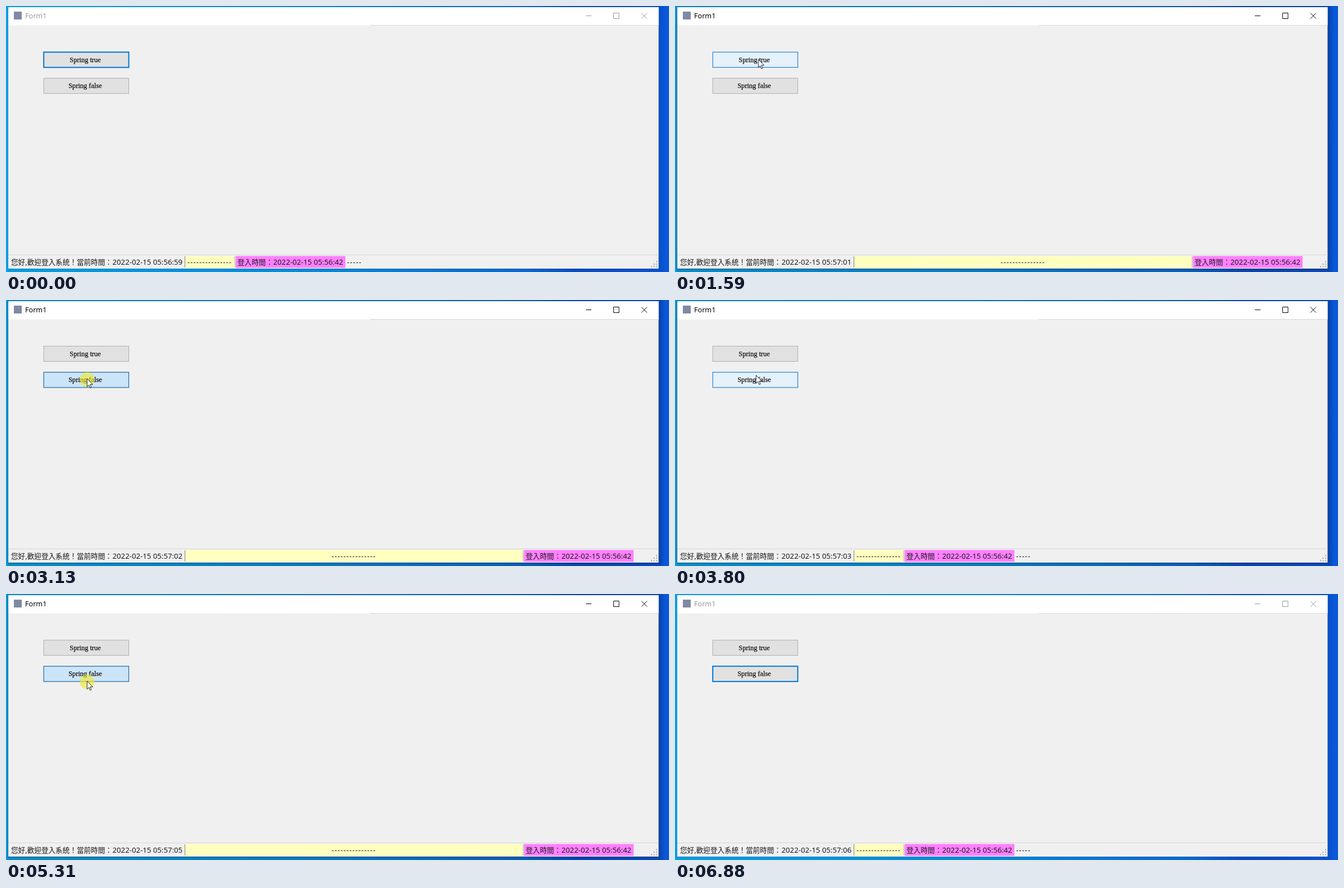
An HTML page for the animation above (6940 ms loop, 1180 px wide and 474 px high).

```html
<!DOCTYPE html>
<html lang="zh-Hant">
<head>
<meta charset="utf-8">
<title>Form1</title>
<style>
  html, body { margin: 0; width: 100%; height: 100%; overflow: hidden; background: #0a57d8; }
  svg { display: block; width: 1180px; height: 474px; }
  .ui { font: 13.2px "Noto Sans", "Open Sans", sans-serif; fill: #1a1a1a; }
  .cjk { font-family: "Noto Sans CJK TC", "Noto Sans CJK", sans-serif; font-size: 12.6px; }
  .dash { letter-spacing: 1.02px; }
  .btn rect { fill: #e1e1e1; stroke: #adadad; }
  .btn text { font: 12.4px "Liberation Serif", serif; text-anchor: middle; fill: #111; stroke: #111; stroke-width: .25; }
  .btn.focus rect { stroke: #0078d7; stroke-width: 2; }
  .btn.hover rect { fill: #e5f1fb; stroke: #2484d4; stroke-width: 1.2; }
  .btn.down rect { fill: #cce4f7; stroke: #1d68a8; stroke-width: 1.2; }
  #caption { font-size: 12.6px; fill: #999; }
  #controls { fill: none; stroke: #999; }
  .active #caption { fill: #000; }
  .active #controls { stroke: #000; }
  #shadow { opacity: .35; }
  .active #shadow { opacity: 1; }
</style>
</head>
<body>
<svg id="stage" viewBox="0 0 1180 474">
  <defs>
    <linearGradient id="sky">
      <stop offset="0" stop-color="#06a6ee"/>
      <stop offset=".45" stop-color="#0791e6"/>
      <stop offset=".78" stop-color="#086edb"/>
      <stop offset=".86" stop-color="#084fcf"/>
      <stop offset="1" stop-color="#0a58da"/>
    </linearGradient>
    <linearGradient id="fade">
      <stop offset="0" stop-color="#001030" stop-opacity=".3"/>
      <stop offset="1" stop-color="#001030" stop-opacity="0"/>
    </linearGradient>
  </defs>

  <rect width="1180" height="474" fill="url(#sky)"/>
  <g id="shadow">
    <rect width="4" height="474" opacity=".07"/>
    <rect x="4" y="468" width="1158" height="6" opacity=".16"/>
    <rect x="1162" width="11" height="474" fill="url(#fade)"/>
    <rect x="3.2" y="1.2" width="1158.8" height="467.6" opacity=".5"/>
  </g>

  <rect x="4" y="2" width="1157.5" height="466" fill="#f0f0f0"/>
  <rect x="4" y="2" width="1157.5" height="32.5" fill="#fff"/>
  <path d="M648 34.5H1161.5M4 443.5H1161.5" stroke="#d7d7d7"/>
  <rect x="14" y="10" width="14" height="14" fill="#8089a3"/>
  <text id="caption" class="ui" x="34" y="22">Form1</text>
  <path id="controls" d="M1032 17.5H1042M1081.5 12.5H1091V22.5H1081.5ZM1131 12.5L1141 22.5M1141 12.5L1131 22.5"/>

  <g class="btn">
    <rect x="67.2" y="82.2" width="151.3" height="27.2"/>
    <text x="141" y="99.5">Spring true</text>
  </g>
  <g class="btn">
    <rect x="67.2" y="128.7" width="151.3" height="27.2"/>
    <text x="141" y="146">Spring false</text>
  </g>

  <g class="ui">
    <text x="9" y="460.5"><tspan class="cjk">您好</tspan>,<tspan class="cjk">歡迎登入系統！當前時間：</tspan><tspan id="clock" x="189.5"></tspan></text>
    <rect id="spring" x="319" y="445.5" height="21" fill="#ffffc0"/>
    <path d="M318.5 446V466" stroke="#858585"/>
    <text id="fill" class="dash" y="460.5">---------------</text>
    <g id="login">
      <path d="M407.5 446V466" stroke="#a3a3a3"/>
      <rect x="409" y="445.5" width="195" height="21" fill="#ff80ff"/>
      <text x="412" y="460.5"><tspan class="cjk">登入時間：</tspan><tspan x="475.5">2022-02-15 05:56:42</tspan></text>
    </g>
    <text id="tail" class="dash" x="607" y="460.5">-----</text>
  </g>
  <path d="M1157 455.5h2M1152.5 460h2M1157 460h2M1148 464.5h2M1152.5 464.5h2M1157 464.5h2" stroke="#a6a6a6" stroke-width="2"/>

  <g id="mouse">
    <circle id="press" cx=".5" cy="1.5" r="13" fill="#f0ec28" opacity=".62"/>
    <path d="M.3 0V14.5L3.6 11.4 5.8 16.6 8 15.7 5.8 10.6H10.3Z" fill="#fff" stroke="#111" stroke-width=".9"/>
  </g>
</svg>

<script>
const LOOP = 6940, STEP = 70;
const $ = id => document.getElementById(id);
const buttons = [...document.querySelectorAll('.btn')];
const tops = [82, 128.5];

const outQuad = p => 1 - (1 - p) ** 2;
const inOut = p => p * p * (3 - 2 * p);
const inSoft = p => p ** 1.5;

// start, steps, from, to, easing
const moves = [
  [330, 10, [1060, 480], [147, 126], outQuad],
  [1030, 4, [147, 126], [148, 95], outQuad],
  [2510, 8, [148, 95], [144, 140], inOut],
  [3730, 8, [144, 140], [144, 103], inOut],
  [4630, 9, [144, 103], [144, 155], inOut],
  [5710, 10, [144, 155], [1125, 462], inSoft]
];
// press, release, button
const clicks = [[1390, 1530, 0], [3060, 3200, 1], [4290, 4430, 0], [5240, 5380, 1]];
const ticks = [130, 1170, 2180, 3200, 4220, 5240, 6270];

function pointer(t) {
  if (t < 330 || t >= 6410) return null;
  const [start, n, a, b, ease] = moves.filter(m => m[0] <= t).pop();
  const p = ease(Math.min(n, Math.floor((t - start) / STEP) + 1) / n);
  return a.map((v, i) => v + (b[i] - v) * p);
}

function draw(t) {
  const pos = pointer(t);
  const held = clicks.find(c => t >= c[0] && t < c[1]);
  const pressed = clicks.filter(c => c[0] <= t).pop();
  const done = clicks.filter(c => c[1] <= t).pop();
  const focus = pressed ? pressed[2] : 0;
  const wide = !!done && done[2] === 0;

  $('stage').classList.toggle('active', t >= 1390 && t < 6880);
  buttons.forEach((b, i) => {
    const over = pos && pos[0] >= 67 && pos[0] <= 219 && pos[1] >= tops[i] && pos[1] <= tops[i] + 27.5;
    const down = held && held[2] === i;
    b.setAttribute('class', 'btn ' + (down ? 'down' : over ? 'hover' : focus === i ? 'focus' : ''));
  });

  const n = ticks.filter(k => k <= t).length;
  $('clock').textContent = '2022-02-15 05:' + (n ? '57:0' + (n - 1) : '56:59');
  $('spring').setAttribute('width', wide ? 601 : 88);
  $('fill').setAttribute('x', wide ? 579.5 : 323);
  $('login').setAttribute('transform', `translate(${wide ? 513 : 0})`);
  $('tail').style.display = wide ? 'none' : '';

  $('mouse').style.display = pos ? '' : 'none';
  $('press').style.display = held ? '' : 'none';
  if (pos) $('mouse').setAttribute('transform', `translate(${pos.map(Math.round)})`);
}

const begin = performance.now();
function frame() {
  draw((performance.now() - begin) % LOOP);
  requestAnimationFrame(frame);
}
frame();
</script>
</body>
</html>
```
